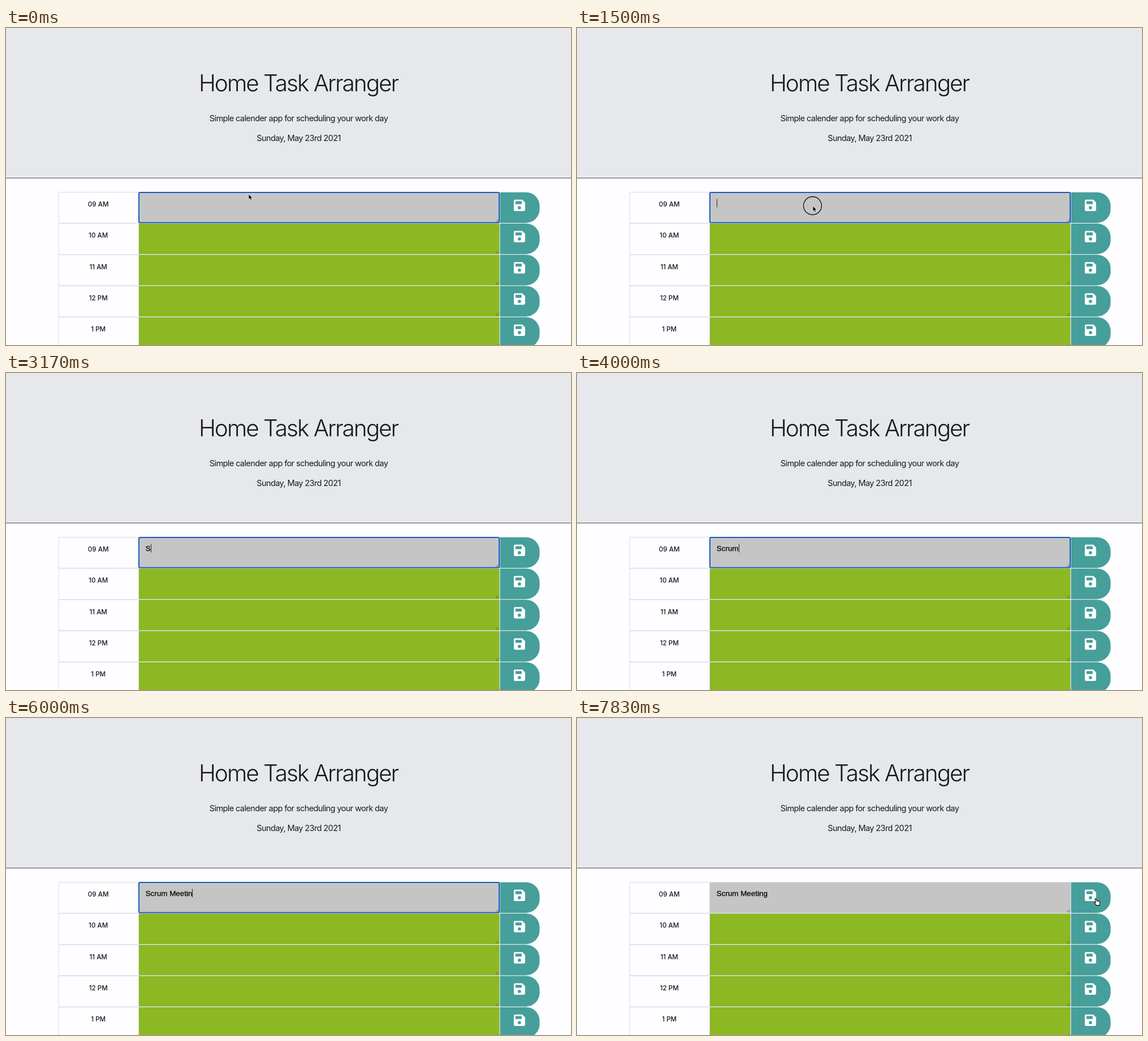
An HTML page for the animation above (8 s loop, 999 px wide and 561 px high).

```html
<!DOCTYPE html>
<html lang="en">
<head>
<meta charset="utf-8">
<title>Home Task Arranger</title>
<style>
  html, body { margin: 0; width: 100%; height: 100%; overflow: hidden; background: #fefdff; }
  svg { display: block; width: 999px; height: 561px; }
  text { font-family: Inter, sans-serif; fill: #17181d; }
  .head { text-anchor: middle; }
  .title { font-size: 40.5px; font-weight: 300; letter-spacing: -2px; }
  .lead { font-size: 14.5px; letter-spacing: -.6px; }
  .hour { text-anchor: middle; font-size: 11.6px; font-weight: 500; }
  #entry { font: 13.4px "Liberation Sans", Arial, sans-serif; fill: #000; stroke: #000; stroke-width: .25px; }
</style>
</head>
<body>
<svg viewBox="0 0 999 561">
  <defs>
    <g id="row">
      <path d="M92.5 0H873V55.3H92.5Z" fill="#d9dde2"/>
      <path d="M93.5 1H234V54.5H93.5Z" fill="#fefdff"/>
      <path d="M873.5 .4H919.5A24 24 0 0 1 943.5 24.4V30.6A24 24 0 0 1 919.5 54.6H873.5Z" fill="#469f9b"/>
      <path fill="#fff" fill-rule="evenodd" d="M900 13.5H912.8L917.8 18.5V31.5Q917.8 33.6 915.7 33.6H900Q897.9 33.6 897.9 31.5V15.6Q897.9 13.5 900 13.5ZM900.8 16.3V21.4H911.8V16.3ZM907.8 24.9A2.9 2.9 0 1 0 907.8 30.7A2.9 2.9 0 1 0 907.8 24.9Z"/>
    </g>
    <path id="grip" d="M866 53.4L871 48.4M869.2 53.4L871 51.6" stroke="#444" stroke-width=".8"/>
  </defs>

  <rect width="999" height="265" fill="#e7e8ec"/>
  <path d="M0 265.5H999" stroke="#4d4f55"/>
  <text class="head title" x="517" y="112">Home Task Arranger</text>
  <text class="head lead" x="517.5" y="165">Simple calender app for scheduling your work day</text>
  <text class="head lead" x="517.5" y="199.5">Sunday, May 23rd 2021</text>

  <g id="rows"></g>
  <rect id="focus" x="235" y="291" width="637" height="53.6" rx="2" fill="none" stroke="#1b5bbd" stroke-width="2"/>
  <text id="entry" x="246.8" y="314.5"></text>
  <path id="caret" d="M.5 302.5V317.5" stroke="#222"/>

  <circle id="ring" r="16" fill="none" stroke="#111" stroke-width="1.3"/>
  <path id="arrow" d="M0 0V9.6L2.2 7.6L3.8 11.2L5.5 10.4L4 7H7Z" fill="#000" stroke="#fff" stroke-width=".7"/>
  <path id="hand" d="M-.6 .8Q.4 -.6 1.5 .6L2.9 4.5Q3.9 3.6 4.5 4.5Q5.5 3.7 6.1 4.7Q7.3 4.2 7.6 5.5L8 8.6L7.2 12H2.2L-1.2 8.2Q-1.8 6.8 -.3 6.9L.9 7.5Z" fill="#fff" stroke="#111" stroke-width="1.1" stroke-linejoin="round"/>
</svg>
<script>
const $ = id => document.getElementById(id);
const LOOP = 8000, STEP = 500 / 3;
const MESSAGE = "Scrum Meeting";
const KEYS = [18, 21, 22, 23, 24, 26, 29, 30, 32, 33, 34, 36, 37];
const CLICK = 8, SAVE = 45;
// Pointer path: step, x, y
const PATH = [[0, 429, 294], [1, 429, 294], [2, 427, 298], [4, 427, 298], [7, 417, 315],
              [38, 417, 315], [40, 580, 324], [42, 850, 322], [43, 916.4, 319.6], [48, 916.4, 319.6]];

$("rows").innerHTML = ["09 AM", "10 AM", "11 AM", "12 PM", "1 PM"].map((hour, i) =>
  `<g transform="translate(0 ${290.3 + i * 55.25})"><use href="#row"/>
   <path d="M235 .8H872.3V54.5H235Z" fill="${i ? "#8cb823" : "#c5c5c6"}"/>
   <use href="#grip"/><text class="hour" x="163.2" y="25.9">${hour}</text></g>`).join("");

function pointerAt(n) {
  const i = Math.max(1, PATH.findIndex(p => p[0] >= n));
  const [a, x0, y0] = PATH[i - 1], [b, x1, y1] = PATH[i];
  const k = (n - a) / (b - a);
  return [x0 + (x1 - x0) * k, y0 + (y1 - y0) * k];
}

const show = (id, on) => $(id).style.display = on ? "" : "none";
const place = (id, x, y) => $(id).setAttribute("transform", `translate(${x} ${y})`);

function draw(ms) {
  const n = Math.floor((ms % LOOP + 5) / STEP);
  const typed = KEYS.filter(k => k <= n).length;
  $("entry").textContent = MESSAGE.slice(0, typed);

  // The caret blinks every three steps, restarting on each input
  const last = [CLICK, ...KEYS].filter(k => k <= n).pop();
  const blink = n < CLICK ? n >= 1 && n < 4 : Math.floor((n - last) / 3) % 2 === 0;
  const focused = n < SAVE;
  show("focus", focused);
  show("caret", focused && blink);
  const width = typed ? $("entry").getComputedTextLength() : 0;
  place("caret", Math.round(246.8 + width), 0);

  const [x, y] = pointerAt(n);
  const visible = n < KEYS[0] || n >= 38;
  const overButton = x > 873;
  show("arrow", visible && !overButton);
  show("hand", visible && overButton);
  show("ring", n >= CLICK && n < CLICK + 2 || n >= SAVE && n < SAVE + 2);
  for (const id of ["arrow", "hand"]) place(id, x, y);
  place("ring", x - .5, y - .5);
}

function tick(now) {
  draw(now);
  requestAnimationFrame(tick);
}
requestAnimationFrame(tick);
</script>
</body>
</html>
```
